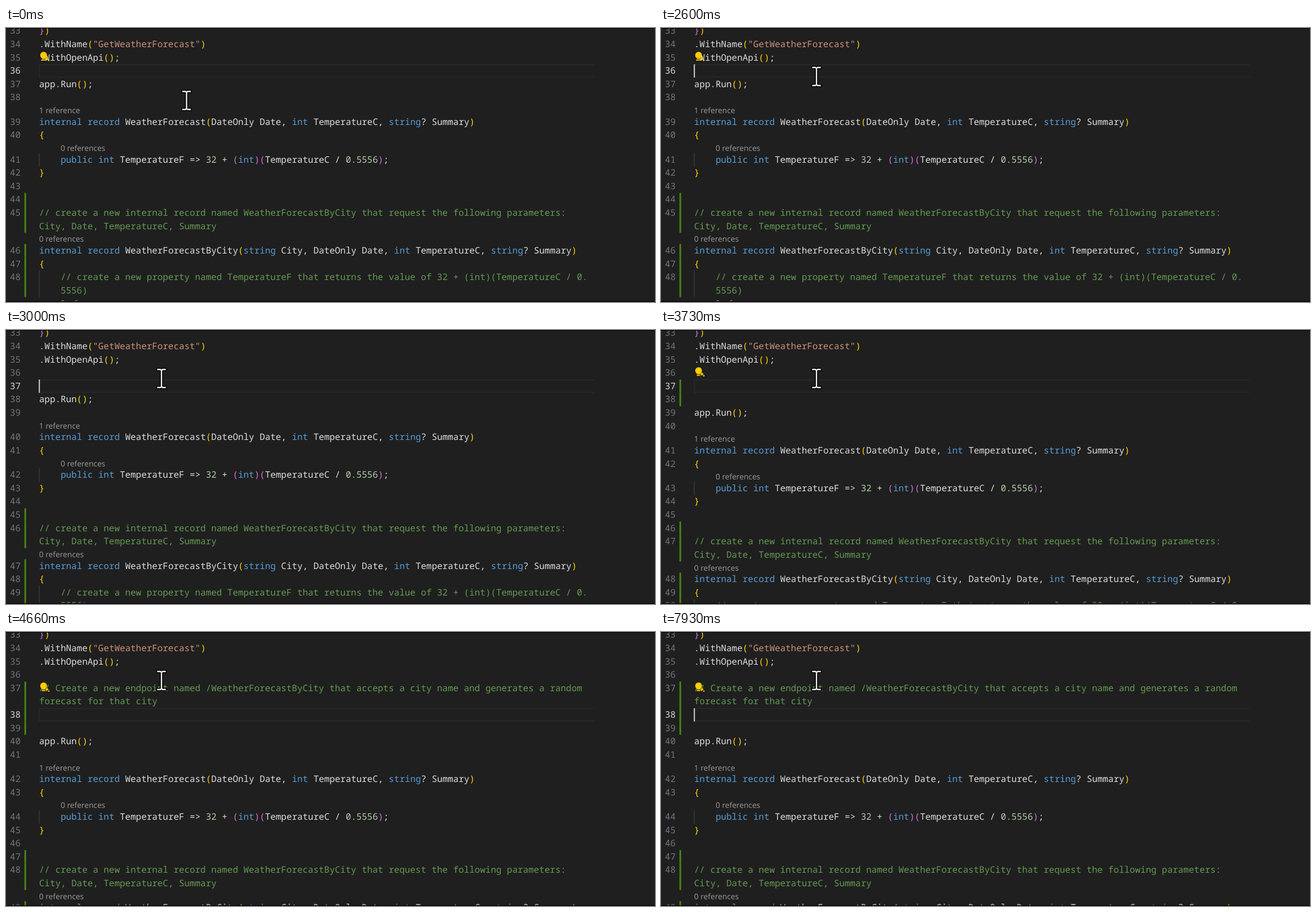
Animation of 1152 by 486 pixels, one loop 8000 ms. Source, as an HTML page with a canvas:

```html
<!DOCTYPE html>
<html lang="en">
<head>
<meta charset="utf-8">
<title>Code editor</title>
<style>
html, body { margin: 0; width: 100%; height: 100%; overflow: hidden; background: #1f1f1f; }
canvas { display: block; }
</style>
</head>
<body>
<canvas id="stage" width="1152" height="486"></canvas>
<script>
const ctx = document.getElementById('stage').getContext('2d');
const LOOP = 8000;
const ROW = 23.6, LENS = 19.7, CHAR = 9.546, LEFT = 58.8, TOP = -6.5, BASE = 16.9;
const CODE_FONT = '500 15.91px "Noto Sans Mono", "DejaVu Sans Mono", monospace';
const LENS_FONT = '13.75px "Open Sans", "Noto Sans", sans-serif';
const C = {
  bg: '#1f1f1f', text: '#dedede', keyword: '#569cd6', comment: '#649a52', string: '#ce9178',
  number: '#b5cea8', lineNo: '#6e7681', active: '#d4d4d4', lens: '#9c9c9c',
  added: '#488610', guide: '#404040', border: '#2a2a2a', caret: '#d0d0d0', bulb: '#ffcc00'
};
const BRACKETS = ['#ffd700', '#da70d6'];
const TOKEN = /"[^"]*"|\b(?:internal|record|public|int|string)\b|\d+(?:\.\d+)?|[(){}]|[A-Za-z]+|[^\s\w"(){}]+/g;
const KEYWORD = /^(internal|record|public|int|string)$/;

// Times of the edits
const ENTER1 = 2930, BULB_OFF = 3000, ENTER2 = 3060, UP = 3200, BULB_ON = 3330,
      PASTE = 3930, ENTER3 = 4200, BULB_BACK = 4460;
const CARET_ON = [[530, 1060], [1600, 2060], [2600, 3730], [3930, 4660],
                  [5200, 5730], [6200, 6730], [7200, 7730], [7930, LOOP]];

const line = (rows, opts = {}) => ({ rows: [].concat(rows), indent: 0, depth: 0, ...opts });
const added = { added: true };

const HEAD = [
  line('})', { depth: 2 }),
  line('.WithName("GetWeatherForecast")'),
  line('.WithOpenApi();'),
  line('')
];
const TAIL = [
  line('app.Run();'),
  line(''),
  line('internal record WeatherForecast(DateOnly Date, int TemperatureC, string? Summary)', { lens: '1 reference' }),
  line('{'),
  line('public int TemperatureF => 32 + (int)(TemperatureC / 0.5556);', { lens: '0 references', indent: 4, depth: 1 }),
  line('}', { depth: 1 }),
  line(''),
  line('', added),
  line(['// create a new internal record named WeatherForecastByCity that request the following parameters:',
        'City, Date, TemperatureC, Summary'], { added: true, comment: true }),
  line('internal record WeatherForecastByCity(string City, DateOnly Date, int TemperatureC, string? Summary)',
       { added: true, lens: '0 references' }),
  line('{', added),
  line(['// create a new property named TemperatureF that returns the value of 32 + (int)(TemperatureC / 0.',
        '5556)'], { added: true, comment: true, indent: 4 }),
  line('', { added: true, lens: '0 references', indent: 4 })
];
const PROMPT = line(['// Create a new endpoint named /WeatherForecastByCity that accepts a city name and generates a random',
                     'forecast for that city'], { added: true, comment: true });

function editorState(t) {
  if (t < ENTER1) return { extra: [], active: 36, bulb: 35 };
  if (t < ENTER2) return { extra: [line('')], active: 37, bulb: t < BULB_OFF ? 35 : 0 };
  if (t < PASTE) {
    return { extra: [line('', added), line('', added)], active: t < UP ? 38 : 37, bulb: t < BULB_ON ? 0 : 36 };
  }
  if (t < ENTER3) return { extra: [PROMPT, line('', added)], active: 37, bulb: 36 };
  return { extra: [PROMPT, line('', added), line('', added)], active: 38, bulb: t < BULB_BACK ? 0 : 37 };
}

function rect(x, y, w, h, color) {
  ctx.fillStyle = color;
  ctx.fillRect(x, y, w, h);
}

function text(str, x, y, color) {
  ctx.fillStyle = color;
  ctx.fillText(str, x, y);
}

function drawCode(str, x, y, depth) {
  for (const m of str.matchAll(TOKEN)) {
    const s = m[0];
    let color = C.text;
    if (/[({]/.test(s)) color = BRACKETS[depth++ % 2];
    else if (/[)}]/.test(s)) color = BRACKETS[--depth % 2];
    else if (s[0] === '"') color = C.string;
    else if (/\d/.test(s)) color = C.number;
    else if (KEYWORD.test(s)) color = C.keyword;
    text(s, x + m.index * CHAR, y, color);
  }
}

function star(x, y, r) {
  ctx.beginPath();
  ctx.moveTo(x, y - r);
  for (const [dx, dy] of [[r, 0], [0, r], [-r, 0], [0, -r]]) {
    ctx.quadraticCurveTo(x, y, x + dx, y + dy);
  }
  ctx.lineWidth = 1.2;
  ctx.strokeStyle = C.bulb;
  ctx.stroke();
  ctx.fill();
}

function drawBulb(y) {
  ctx.fillStyle = C.bulb;
  ctx.beginPath();
  ctx.arc(66.7, y - 4.2, 6, 0, 7);
  ctx.fill();
  ctx.fillRect(63.6, y, 6, 2.2);
  ctx.fillRect(63.6, y + 3.2, 6, 2);
  star(72.6, y + 2, 2.8);
  star(76, y + 5, 1.3);
}

function drawPointer(t) {
  const step = Math.floor((t - 130) / 67) + 1;
  const p = Math.min(1, Math.max(0, step / 5));
  const e = p * p * (3 - 2 * p);
  ctx.save();
  ctx.translate(320.5 - 44.5 * e, 128.5 - 42.5 * e);
  ctx.beginPath();
  for (const s of [-1, 1]) {
    ctx.moveTo(-6.5, 16 * s);
    ctx.lineTo(-2, 16 * s);
    ctx.lineTo(0, 14.5 * s);
    ctx.lineTo(2, 16 * s);
    ctx.lineTo(6.5, 16 * s);
  }
  ctx.moveTo(0, -14.5);
  ctx.lineTo(0, 14.5);
  ctx.lineCap = 'square';
  for (const [width, color] of [[5.6, '#000000'], [2.4, '#f0f0f0']]) {
    ctx.lineWidth = width;
    ctx.strokeStyle = color;
    ctx.stroke();
  }
  ctx.restore();
}

function drawActive(y, h) {
  rect(58.4, y, 986, 1.5, C.border);
  rect(58.4, y + h - 1.7, 986, 1.5, C.border);
  rect(58.4, y, 1.5, h, C.border);
}

function draw(t) {
  const { extra, active, bulb } = editorState(t);
  rect(0, 0, 1152, 486, C.bg);
  ctx.textRendering = 'geometricPrecision';
  let y = TOP, no = 33, bulbY = 0, caret = null;

  for (const ln of [...HEAD, ...extra, ...TAIL]) {
    const x = LEFT + ln.indent * CHAR;
    if (ln.lens) {
      ctx.font = LENS_FONT;
      text(ln.lens, x, y + 16, C.lens);
      y += LENS;
    }
    const h = ln.rows.length * ROW;
    ctx.font = CODE_FONT;
    if (ln.added) rect(32.7, y, 3, h, C.added);
    if (ln.indent) rect(58.4, y, 1.2, h, C.guide);
    if (no === active) {
      drawActive(y, h);
      const last = ln.rows.length - 1;
      caret = [LEFT - 0.6 + ln.rows[last].length * CHAR, y + last * ROW];
    }
    if (no === bulb) bulbY = y + ROW / 2;
    text(String(no), 7, y + BASE, no === active ? C.active : C.lineNo);
    ln.rows.forEach((str, i) => {
      const base = y + i * ROW + BASE;
      if (ln.comment) text(str, x, base, C.comment);
      else drawCode(str, x, base, ln.depth);
    });
    y += h;
    no++;
  }

  if (bulbY) drawBulb(bulbY);
  if (CARET_ON.some(([a, b]) => t >= a && t < b)) rect(caret[0], caret[1], 2, ROW, C.caret);
  drawPointer(t);
  rect(0, 0, 1152, 1, '#000000');
  rect(0, 484.6, 1152, 1.4, '#050505');
}

function frame() {
  draw(performance.now() % LOOP);
  requestAnimationFrame(frame);
}
frame();
</script>
</body>
</html>
```
